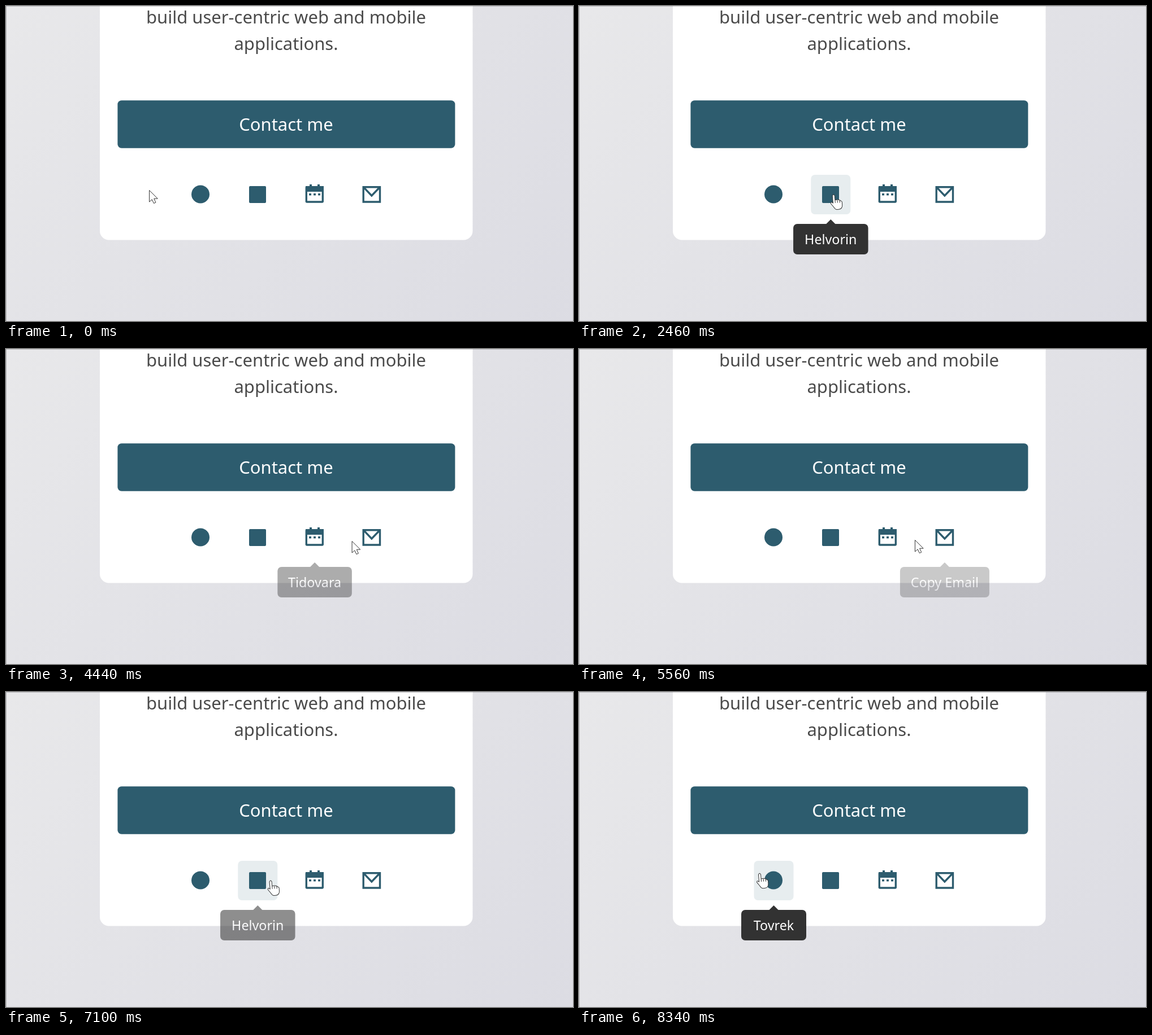
Recreate the animation shown at these times as an HTML page. Size 1003 by 558 pixels, loop 8.36 s.

```html
<!DOCTYPE html>
<html lang="en">
<head>
<meta charset="utf-8">
<title>Contact card</title>
<style>
  html, body { margin: 0; width: 100%; height: 100%; overflow: hidden; }
  body { background: linear-gradient(135deg, #e8e8ea, #dcdce3); }
  svg { display: block; width: 100%; height: 100%; }
  text { font: 31px "Noto Sans", "Open Sans", sans-serif; text-anchor: middle; fill: #4a4a4a; }
  .light { fill: #fff; }
  .tip { fill: #323232; }
  .tip text { font-size: 23.3px; fill: #fff; }
  .teal { fill: #2d5c6e; }
  .line { fill: none; stroke: #2d5c6e; stroke-width: 3.4; }
  .cursor { fill: #fff; stroke: #333; stroke-linejoin: round; }
</style>
</head>
<body>
<svg viewBox="0 0 1003 558">
  <path d="M0 .5H1003M.5 0V558" stroke="#b9b9bd"/>
  <rect x="166" y="-40" width="659.5" height="454.5" rx="16" fill="#fff"/>
  <path d="M166 .5H826" stroke="#c9c9cc"/>
  <text x="495.5" y="31">build user-centric web and mobile</text>
  <text x="495.5" y="77.5">applications.</text>
  <rect class="teal" x="197.4" y="167.2" width="597" height="84.6" rx="7"/>
  <text class="light" x="495.5" y="221">Contact me</text>

  <rect id="hover" y="299" width="70" height="70" rx="7" fill="#e7edef"/>

  <circle class="teal" cx="344" cy="333.5" r="16"/>
  <rect class="teal" x="430" y="319" width="30" height="30" rx="2"/>
  <rect class="line" x="531.3" y="320.7" width="29" height="26.3" rx="1"/>
  <path class="teal" d="M530 319h32v10h-32zM537 316h4v4h-4zM551 316h4v4h-4z"/>
  <path class="line" d="M536 333.8h20" stroke-dasharray="4"/>
  <path class="line" d="M632.2 320.7h29.3v26.3h-29.3zL646.8 336 661.5 320.7"/>

  <g id="tips"></g>

  <path id="arrow" class="cursor" d="M.5 .5V21L5.2 16.8 8.4 23.6 11.8 22 8.7 15.2H15.2Z"/>
  <g id="hand">
    <path class="cursor" transform="rotate(-5)" d="M-2 2Q0-2 2 2V10Q9 8 14 14V19Q14 27 7 27H4Q1 27-1.5 22L-6 15.5Q-6 11-2 15ZM2 10v5M6 10.5v4.5M10 11.5v4"/>
  </g>
</svg>
<script>
const LOOP = 8360, FADE = 300, SAMPLES = 30, HALF = 35;
const byId = id => document.getElementById(id);
const iconX = i => 344.5 + 100.8 * i;

// label and tooltip width
const labels = [["Tovrek", 115], ["Helvorin", 132.5], ["Tidovara", 131.5], ["Copy Email", 158]];

// pointer sweeps right over the icons, then back: time, x, y
const path = [
  [0, 253, 326], [1500, 358, 334], [2460, 450, 334], [4280, 581, 339], [4440, 611.5, 340],
  [4955, 650, 341], [5560, 594, 338], [7100, 468, 334], [LOOP, 317, 321]
];

byId("tips").innerHTML = labels.map(([label, w], i) => `
  <g class="tip" transform="translate(${iconX(i)} 386)">
    <path d="M-8 0l8-8 8 8z"/>
    <rect x="${-w / 2}" width="${w}" height="54" rx="7"/>
    <text y="36">${label}</text>
  </g>`).join("");
const tips = [...document.querySelectorAll(".tip")];

const smooth = p => p * p * (3 - 2 * p);

function pointerAt(t) {
  const i = path.findIndex(k => k[0] > t);
  const [t0, x0, y0] = path[i - 1], [t1, x1, y1] = path[i];
  const p = (t - t0) / (t1 - t0);
  return [x0 + (x1 - x0) * p, y0 + (y1 - y0) * p];
}

function iconAt(t) {
  const [x] = pointerAt(Math.max(0, t));
  return labels.findIndex((_, i) => Math.abs(x - iconX(i)) < HALF);
}

function draw(t) {
  // a tooltip is as visible as the share of recent time spent on its icon
  const shares = labels.map(() => 0);
  for (let k = 0; k < SAMPLES; k++) {
    const i = iconAt(t - FADE * k / SAMPLES);
    if (i >= 0) shares[i] += 1 / SAMPLES;
  }
  tips.forEach((tip, i) => tip.setAttribute("opacity", smooth(shares[i])));

  const active = iconAt(t), over = active >= 0;
  byId("hover").setAttribute("x", iconX(active) - HALF);
  byId("hover").style.display = over ? "" : "none";

  const [x, y] = pointerAt(t);
  byId("arrow").style.display = over ? "none" : "";
  byId("hand").style.display = over ? "" : "none";
  for (const id of ["arrow", "hand"]) byId(id).setAttribute("transform", `translate(${x} ${y})`);
}

const begin = performance.now();
function tick() {
  draw((performance.now() - begin) % LOOP);
  requestAnimationFrame(tick);
}
tick();
</script>
</body>
</html>
```
